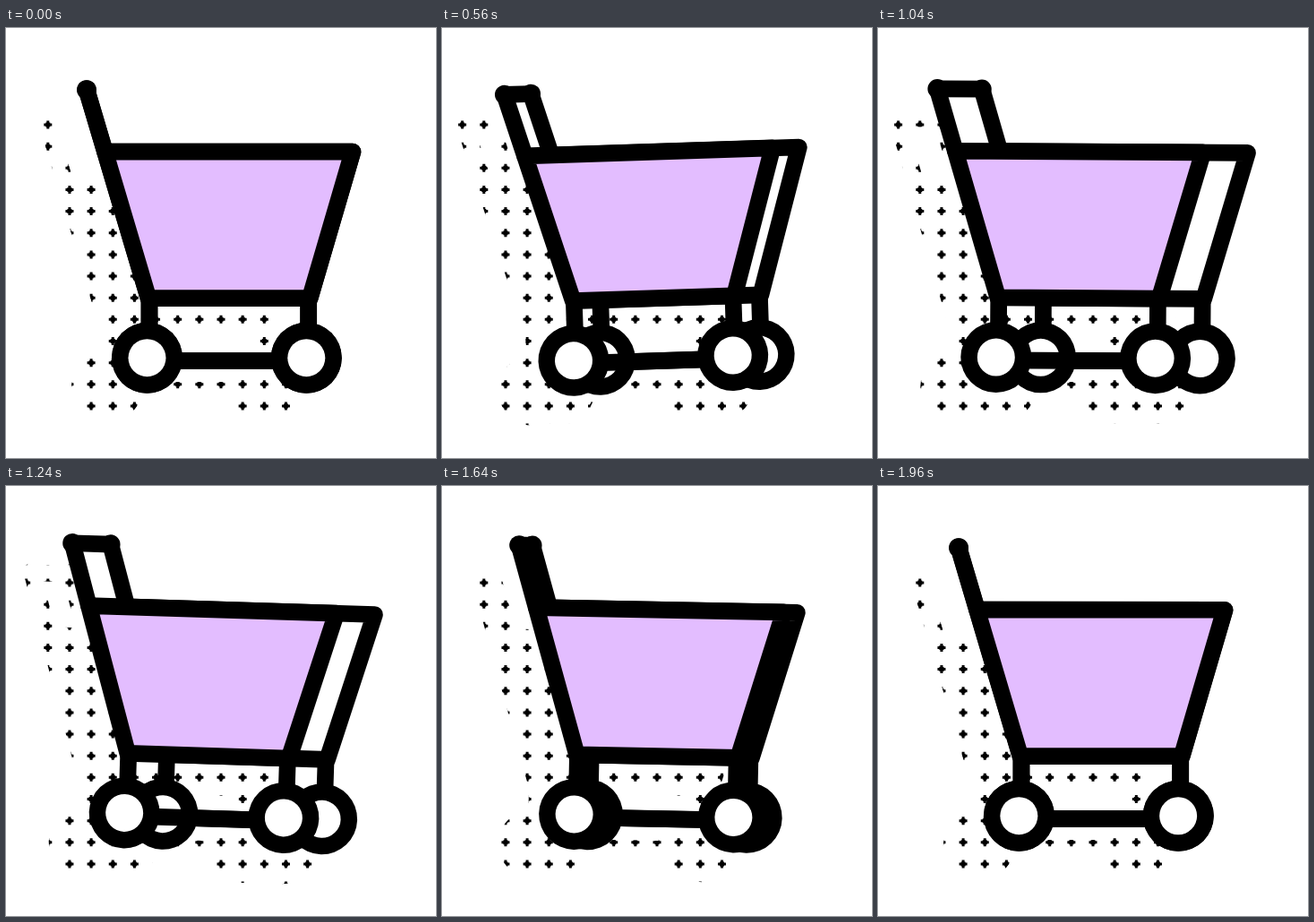
Animation, 480 px wide and 480 px high, one loop 2000 ms. Source, as an HTML page with a canvas:

```html
<!DOCTYPE html>
<html lang="en">
<head>
<meta charset="utf-8">
<title>Shopping cart</title>
<style>
html, body { margin: 0; width: 100%; height: 100%; overflow: hidden; background: #fff; }
canvas { display: block; }
</style>
</head>
<body>
<canvas id="stage" width="480" height="480"></canvas>
<script>
const ctx = document.getElementById('stage').getContext('2d');
const LOOP = 2000, STEP = 40;
const LINE = 18.7, DEPTH = 25, TILT = 2;
const GRID = 24.15;

const dots = new Path2D();
for (let x = 240 - 9 * GRID; x < 480; x += GRID) {
  for (let y = 108 - 4 * GRID; y < 480; y += GRID) {
    dots.rect(x - 4.5, y - 1.5, 9, 3);
    dots.rect(x - 1.5, y - 4.5, 3, 9);
    dots.rect(x - 2.5, y - 2.5, 5, 5);
  }
}

const clamp = v => Math.min(1, Math.max(0, v));
const smooth = v => (v = clamp(v), v * v * (3 - 2 * v));

// Value at time t along [time, value] keys, eased between each pair
function track(t, keys) {
  let value = keys[0][1];
  for (let i = 1; i < keys.length; i++) {
    const [t0, v0] = keys[i - 1], [t1, v1] = keys[i];
    value += (v1 - v0) * smooth((t - t0) / (t1 - t0));
  }
  return value;
}

function line(...pts) {
  ctx.beginPath();
  for (let i = 0; i < pts.length; i += 2) ctx.lineTo(pts[i], pts[i + 1]);
  ctx.stroke();
}

function disc(x, y, r, color) {
  ctx.beginPath();
  ctx.arc(x, y, r, 0, 7);
  ctx.fillStyle = color;
  ctx.fill();
}

function side(dx, color) {
  ctx.save();
  ctx.translate(dx, 0);
  line(157.5, 371.5, 335.5, 371.5);
  line(160, 302, 160, 345);
  line(337.7, 302, 337.7, 345);
  for (const x of [157.5, 335.3]) {
    disc(x, 368.2, 39.5, '#000');
    disc(x, 368.2, 21, '#fff');
  }
  ctx.beginPath();
  ctx.moveTo(110.5, 138.2);
  ctx.lineTo(387, 138.2);
  ctx.lineTo(339.2, 301.6);
  ctx.lineTo(159, 301.6);
  ctx.closePath();
  ctx.fillStyle = color;
  ctx.fill();
  ctx.stroke();
  line(90, 69, 110.5, 138.2);
  disc(90, 69, 10.8, '#000');
  ctx.restore();
}

function cart(depth, angle, dx, dy) {
  ctx.save();
  ctx.translate(240 + dx, 240 + dy);
  ctx.rotate(angle * Math.PI / 180);
  ctx.translate(-240, -240);
  side(depth, '#fff');
  side(-depth, '#e3bdff');
  line(90 - depth, 69, 90 + depth, 69);
  ctx.restore();
}

function draw(t) {
  const depth = track(t, [[0, 0], [1000, DEPTH], [2000, 0]]);
  const angle = track(t, [[0, 0], [LOOP / 3, -TILT], [LOOP * 2 / 3, TILT], [LOOP, 0]]);
  ctx.clearRect(0, 0, 480, 480);
  ctx.lineWidth = LINE;
  ctx.lineCap = ctx.lineJoin = 'round';
  // Dotted shadow: the cart's silhouette filled with the fixed grid
  cart(depth, angle, -45, 33);
  ctx.globalCompositeOperation = 'source-in';
  ctx.fillStyle = '#000';
  ctx.fill(dots);
  ctx.globalCompositeOperation = 'source-over';
  cart(depth, angle, 0, 0);
}

function tick() {
  draw(Math.floor(performance.now() % LOOP / STEP) * STEP);
  requestAnimationFrame(tick);
}
tick();
</script>
</body>
</html>
```
